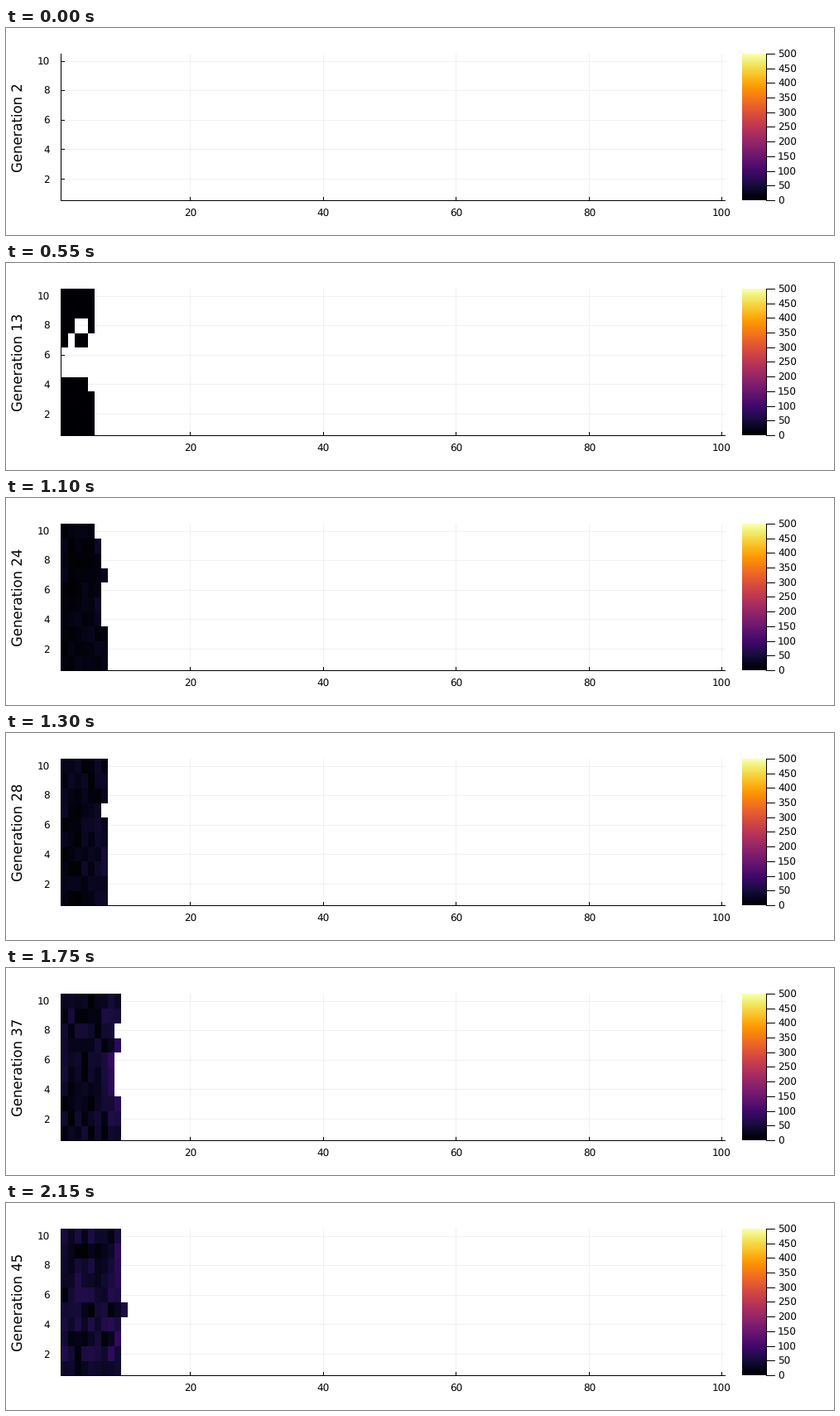
Recreate the animation shown at these times as a matplotlib script. Size 1000 px wide and 250 px high, loop 2200 ms.

```python
import numpy as np
import matplotlib.pyplot as plt
from matplotlib.animation import FuncAnimation

plt.rcParams.update({"font.family": "DejaVu Sans", "text.hinting": "none"})

PX = 0.72  # points per pixel at 100 dpi
FIRST, FRAMES = 2, 44
N = 10
HOLD = 5  # generations a random level lasts

# Curves over the generations
KEYS = [2, 13, 20, 28, 37, 45]
FRONT = [0, 4.8, 5.5, 7.1, 8.8, 9.1]       # filled length
RAGGED = [0, 0.4, 0.6, 0.8, 0.6, 0.5]      # spread of the lengths
LEVEL = [1, 2, 7, 21, 33, 41]              # typical value
GAPS = [0.3, 0.08, 0.02, 0.014, 0, 0]      # share of empty cells

rng = np.random.default_rng(8)
EPOCHS = (FIRST + FRAMES) // HOLD + 2
JITTER = rng.uniform(-1, 1, (EPOCHS, N))
ROLLS = rng.random((EPOCHS, N, N))
PHASE = rng.integers(0, HOLD, (N, N))
GAP_ROLL = rng.random((N, N))
ROWS, COLS = np.indices((N, N))


def cells(gen):
    """Grid of values for one generation, masked where empty."""
    front, ragged, level, gaps = (np.interp(gen, KEYS, curve)
                                  for curve in (FRONT, RAGGED, LEVEL, GAPS))
    # The middle rows start late
    late = np.interp(gen, [2, 13, 19], [6.5, 6.5, 0])
    dip = late * np.exp(-(np.arange(N) - 4.5) ** 2)
    length = np.round(front - dip + ragged * JITTER[gen // HOLD])[:, None]
    roll = ROLLS[(gen + PHASE) // HOLD, ROWS, COLS]
    # The newest cells of a row are the brightest
    edge = np.exp(COLS + 1 - np.maximum(length, COLS + 1))
    grid = level * (0.1 + 1.6 * roll + 0.8 * edge)
    empty = (COLS >= length) | (GAP_ROLL < gaps)
    return np.ma.masked_array(grid, empty)


fig = plt.figure(figsize=(10, 2.5), dpi=100, facecolor="white")
ax = fig.add_axes([0, 0, 1, 1])
ax.set_xlim(0, 1000)
ax.set_ylim(250, 0)
ax.axis("off")


def x_pos(value):
    return 66.6 + 8.02 * (value - 0.5)


def y_pos(value):
    return 208.6 - 17.72 * (value - 0.5)


def mid(pos):
    """Centre of the pixel that holds pos."""
    return np.floor(pos) + 0.5


def line(x0, y0, x1, y1, color="black", z=1.5):
    ax.plot([x0, x1], [y0, y1], color=color, lw=PX, zorder=z, snap=False,
            solid_capstyle="butt")


def label(x, y, text, ha):
    ax.text(x, y + 4.4, text, ha=ha, va="baseline", fontsize=12 * PX)


def mesh(x, y, values, top):
    return ax.pcolormesh(x, y, values, cmap="inferno", vmin=0, vmax=top,
                         antialiased=False, zorder=2)


for value in range(20, 101, 20):
    x = mid(x_pos(value))
    line(x, 31, x, 208, "#f0f0f0", 1)
    line(x, 204, x, 209)
    label(x, 223.5, str(value), "center")

for value in range(2, 11, 2):
    y = mid(y_pos(value))
    line(67, y, 869, y, "#f0f0f0", 1)
    line(66, y, 71, y)
    label(53, y, str(value), "right")

line(66.5, 31, 66.5, 209, z=3)
line(66, 208.5, 869, 208.5, z=3)

mesh([889, 918], np.arange(208, 30, -1), np.linspace(0, 1, 177)[:, None], 1)
line(918.5, 31, 918.5, 209, z=3)
for value in range(0, 501, 50):
    y = mid(208.5 - 0.3544 * value)
    line(918, y, 929, y, z=3)
    label(932, y - 0.3, str(value), "left")

edges = np.arange(N + 1) + 0.5
heat = mesh(x_pos(edges), y_pos(edges), cells(FIRST), 500)
title = ax.text(20.4, 120, "", rotation=90, rotation_mode="anchor",
                ha="center", va="baseline", fontsize=16.5 * PX)


def update(i):
    gen = FIRST + i
    heat.set_array(cells(gen))
    title.set_text(f"Generation {gen}")
    return heat, title


anim = FuncAnimation(fig, update, frames=FRAMES, interval=50,
                     init_func=lambda: update(0), repeat=True,
                     repeat_delay=0)
plt.show()
```
